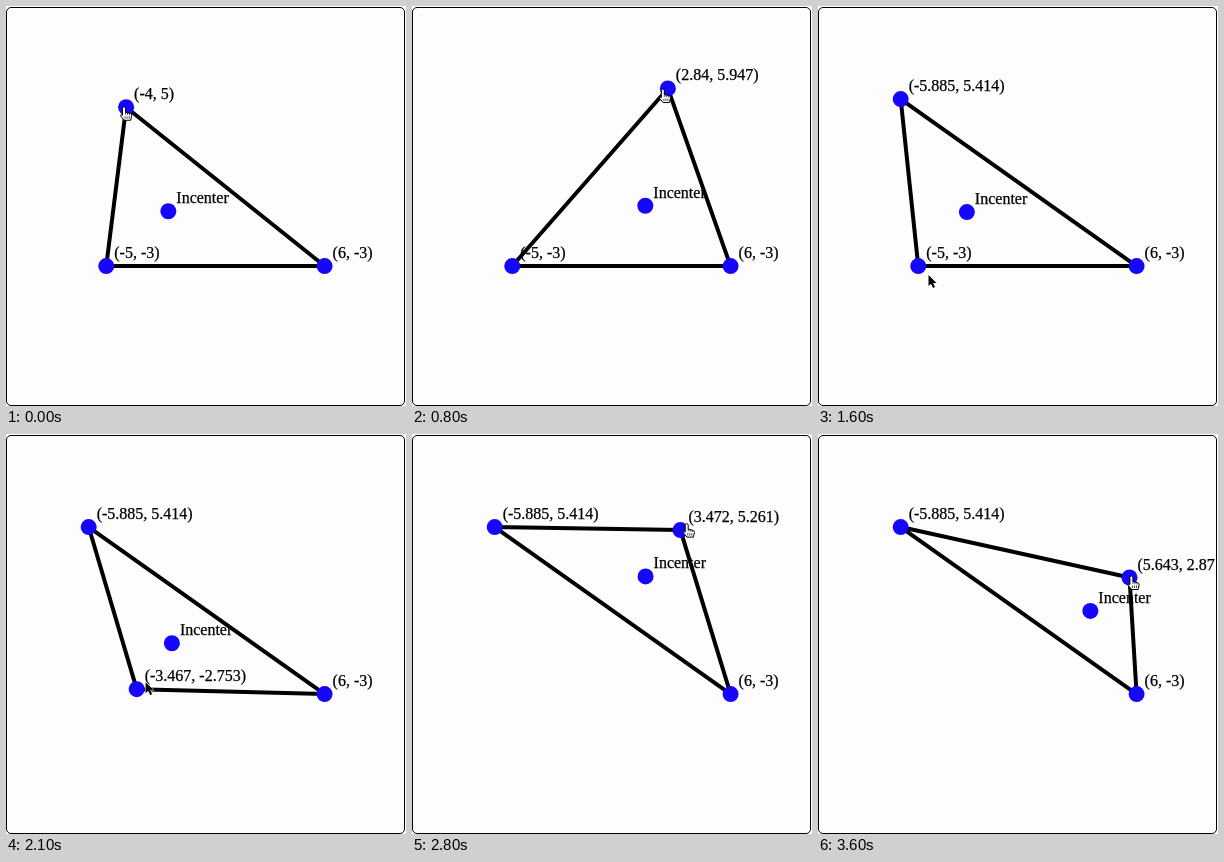
An HTML page for the animation above (3.7 s loop, 400 px wide and 400 px high).

```html
<!DOCTYPE html>
<html lang="en">
<head>
<meta charset="utf-8">
<title>Incenter of a triangle</title>
<style>
  html, body { margin: 0; width: 100%; height: 100%; overflow: hidden; background: #fff; }
  #board {
    position: absolute; left: 0; top: 1px; width: 399px; height: 399px;
    box-sizing: border-box; overflow: hidden;
    border: 1px solid #000; border-radius: 5px; background: #fdfdfd;
  }
  svg { display: block; }
  text {
    font: 16px "Liberation Serif", "Times New Roman", serif;
    fill: #000; stroke: #000; stroke-width: .25;
  }
  polygon { fill: none; stroke: #000; stroke-width: 4; stroke-linejoin: round; }
  circle { fill: #1606fc; }
  .hand { fill: #fff; stroke: #000; stroke-width: 1; stroke-linejoin: round; }
  .arrow { fill: #000; stroke: #fff; stroke-width: 1; paint-order: stroke; }
</style>
</head>
<body>
<div id="board">
  <svg width="397" height="397" viewBox="1 2 397 397">
    <polygon id="tri"/>
    <g id="dots"></g>
    <g id="labels"></g>
    <g id="hand" class="hand">
      <path d="M-1.6 8V1a1.5 1.5 0 0 1 3 0V5l4.8 1.2q1.6.5 1.4 2.2L6.6 13H.2L-3.6 8.6Q-3.4 6.6-1.6 8z"/>
      <path d="M1.4 5v2.4M3.4 5.6v2M5.4 6v2M1 9v2.5M3 9v2.5M5 9v2.5" fill="none" stroke-width=".7"/>
    </g>
    <path id="arrow" class="arrow" d="M0 0V11l2.6-2.3 1.9 4.2 2-.9-1.9-4.1H8z"/>
  </svg>
</div>
<script>
const STEP = 100, STEPS = 37, LEAD = 0.3;
const CENTER = [199.5, 200.5], UNIT = 19.85;
const C = [6, -3], HOVER = [110.5, 269];

// Two drags: key points [step, x, y] in board units, and where the pointer grips the dot
const dragA = {
  keys: [[2, -4, 5], [5, -1.6, 7.3], [8, 2.84, 5.947], [15, -5.885, 5.414]],
  grip: [-2, 0]
};
const dragB = {
  keys: [[17, -5, -3], [19, -5.4, -4.3], [24, -0.019, 0.517],
         [28, 3.472, 5.261], [32, 5.856, 7.153], [36, 5.643, 2.871]],
  grip: [2, -1]
};

const $ = id => document.getElementById(id);
const toPx = ([x, y]) => [CENTER[0] + UNIT * x, CENTER[1] - UNIT * y];

// Smooth curve through the key points, held still beyond both ends
function along({ keys }, t) {
  const last = keys.length - 1;
  if (t <= keys[0][0]) return keys[0].slice(1);
  if (t >= keys[last][0]) return keys[last].slice(1);
  const i = keys.findIndex(k => k[0] > t) - 1;
  const slope = (n, d) => {
    const p = keys[Math.max(n - 1, 0)], q = keys[Math.min(n + 1, last)];
    return (q[d] - p[d]) / (q[0] - p[0]);
  };
  const p = keys[i], q = keys[i + 1], h = q[0] - p[0], s = (t - p[0]) / h, r = 1 - s;
  return [1, 2].map(d =>
    p[d] * (1 + 2 * s) * r * r + q[d] * s * s * (3 - 2 * s) +
    h * s * r * (slope(i, d) * r - slope(i + 1, d) * s));
}

function incenter(a, b, c) {
  const dist = (p, q) => Math.hypot(p[0] - q[0], p[1] - q[1]);
  const wa = dist(b, c), wb = dist(a, c), wc = dist(a, b);
  return [0, 1].map(d => (wa * a[d] + wb * b[d] + wc * c[d]) / (wa + wb + wc));
}

// The pointer runs slightly ahead of the dot it drags
function pointer(k) {
  if (k === 16) return HOVER;
  const drag = k < 16 ? dragA : dragB;
  return toPx(along(drag, k + LEAD)).map((v, d) => v + drag.grip[d]);
}

const add = (tag, parent) =>
  $(parent).appendChild(document.createElementNS("http://www.w3.org/2000/svg", tag));
const marks = [0, 1, 2, 3].map(() => {
  const dot = add("circle", "dots");
  dot.setAttribute("r", 8);
  return { dot, label: add("text", "labels") };
});

function place({ dot, label }, point, text) {
  const [x, y] = toPx(point);
  dot.setAttribute("cx", x);
  dot.setAttribute("cy", y);
  label.setAttribute("x", x + 8);
  label.setAttribute("y", y - 8);
  label.textContent = text || `(${point.map(v => +v.toFixed(3)).join(", ")})`;
}

function draw(k) {
  const a = along(dragA, k), b = along(dragB, k);
  $("tri").setAttribute("points", [a, b, C].map(toPx).join(" "));
  [a, b, C].forEach((p, i) => place(marks[i], p));
  place(marks[3], incenter(a, b, C), "Incenter");

  const isArrow = k >= 15 && k < 25;
  $(isArrow ? "arrow" : "hand").setAttribute("transform", `translate(${pointer(k)})`);
  $("arrow").style.display = isArrow ? "" : "none";
  $("hand").style.display = isArrow ? "none" : "";
}

const start = performance.now();
let shown = -1;
function tick() {
  const k = Math.floor((performance.now() - start) / STEP) % STEPS;
  if (k !== shown) draw(shown = k);
  requestAnimationFrame(tick);
}
tick();
</script>
</body>
</html>
```
